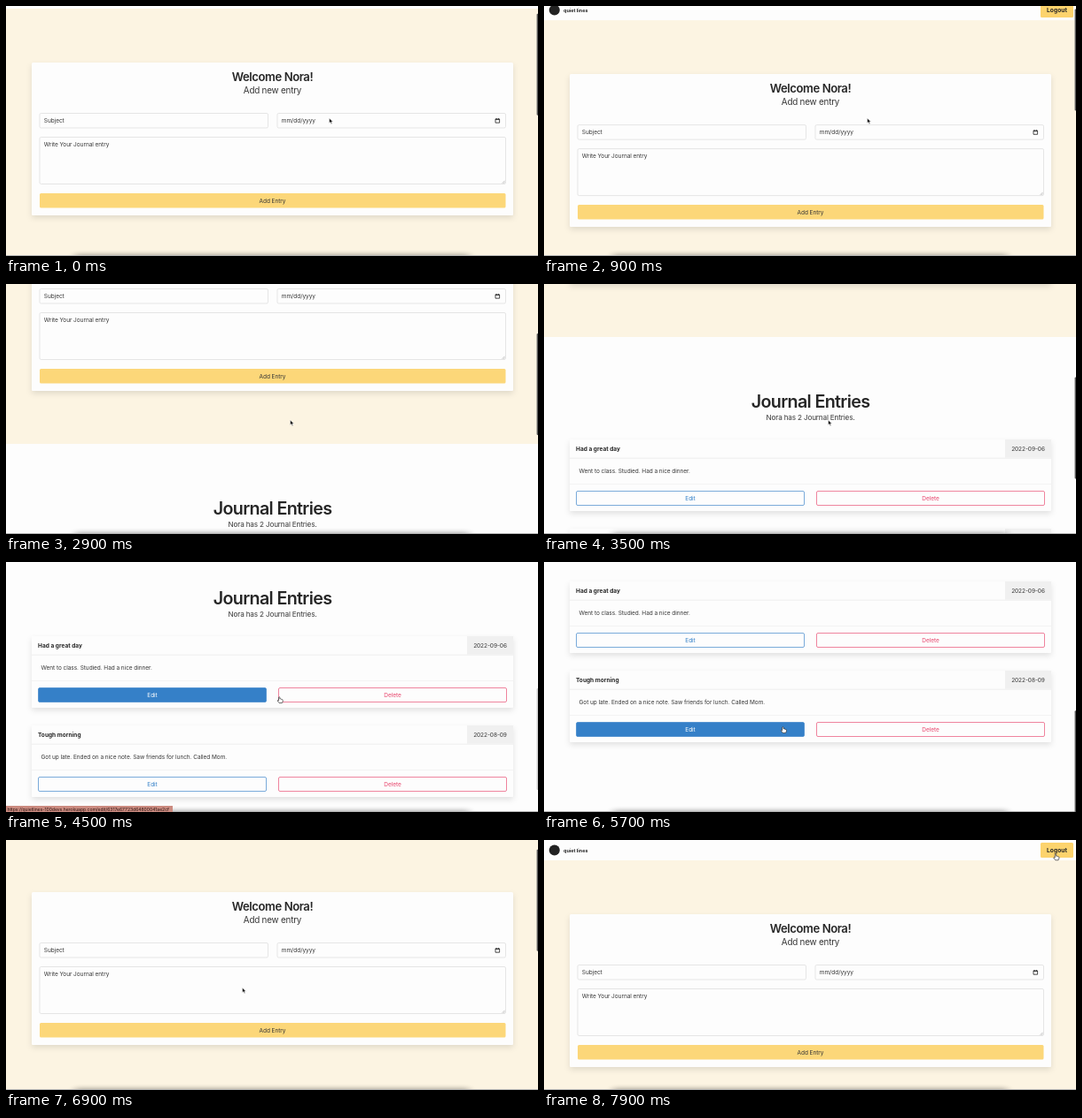
Animation, 600 px wide and 283 px high, one loop 8000 ms. Source, as an HTML page:

```html
<!DOCTYPE html>
<html lang="en">
<head>
<meta charset="utf-8">
<title>Journal</title>
<style>
  html, body { margin: 0; width: 100%; height: 100%; overflow: hidden; background: #fdfdfd; }
  svg { display: block; width: 100vw; height: 100vh; }
  text { font-family: Inter, "Open Sans", sans-serif; font-size: 6.5px; letter-spacing: -.008em; fill: #363636; white-space: pre; }
  .mid { text-anchor: middle; }
  .bold { font-weight: 700; letter-spacing: .005em; fill: #262626; }
  .head { font-weight: 600; letter-spacing: -.033em; fill: #262626; }
  .sub { letter-spacing: -.022em; }
  .field { fill: #fdfdfd; stroke: #dcdcdc; stroke-width: .7; }
</style>
</head>
<body>
<svg viewBox="0 0 600 283" preserveAspectRatio="none">
  <defs>
    <filter id="lift" x="-5%" y="-10%" width="110%" height="130%">
      <feDropShadow dx="0" dy="3" stdDeviation="3" flood-color="#0a0a0a" flood-opacity=".11"/>
    </filter>
    <filter id="edge" x="-2%" y="-20%" width="104%" height="150%">
      <feDropShadow dx="0" dy=".8" stdDeviation=".6" flood-color="#0a0a0a" flood-opacity=".1"/>
    </filter>
    <filter id="soft" x="-10%" y="-200%" width="120%" height="500%">
      <feGaussianBlur stdDeviation="5 2.8"/>
    </filter>
  </defs>
  <rect width="600" height="283" fill="#fdfdfd"/>
  <g id="page"></g>
  <rect x="78" y="281" width="444" height="8" opacity=".32" filter="url(#soft)"/>
  <rect y="282" width="600" height="1" fill="#b4b4b4"/>
  <rect id="thumb" x="598.6" width="2" height="115" rx="1" fill="#555"/>
  <g id="status">
    <rect y="276" width="188" height="7" fill="#cb8b80"/>
    <text id="link" x="1.5" y="281.6" style="font-size:5.1px;fill:#2e1713"></text>
  </g>
  <path id="arrow" d="M0 0V5.6L1.4 4.4L2.3 6.4L3.3 6L2.4 4H4.1Z" fill="#111" stroke="#fff" stroke-width=".5"/>
  <path id="hand" d="M-.3 .6Q.4 -.4 1.1 .6V2.4Q2 2 2.3 2.7Q3.2 2.4 3.4 3.1Q4.3 2.9 4.4 3.8V5.2L3.6 7H.3L-1.8 4.3Q-1.6 3.4 -.3 4.3Z" fill="#fff" stroke="#222" stroke-width=".65" stroke-linejoin="round"/>
</svg>
<script>
const LOOP = 8000, STEP = 100, LINK_DELAY = 600;
const BLUE = '#3580c8', RED = '#e8446c', YELLOW = '#fcd779';
const LINK = 'https://quietlines-100devs.herokuapp.com/edit/';
const $ = id => document.getElementById(id);
const clamp = v => Math.max(0, Math.min(1, v));

function add(parent, tag, attrs, text) {
  const el = document.createElementNS('http://www.w3.org/2000/svg', tag);
  for (const k in attrs) el.setAttribute(k, attrs[k]);
  if (text) el.textContent = text;
  return parent.appendChild(el);
}
const page = $('page');
const box = (x, y, width, height, more) => add(page, 'rect', { x, y, width, height, ...more });
const label = (x, y, text, cls = '', size = 6.5) =>
  add(page, 'text', { x, y, class: cls, style: `font-size:${size}px` }, text);
const panel = (y, height) => box(29, y, 543, height, { rx: 1.5, fill: '#fdfdfd', filter: 'url(#lift)' });

function field(x, y, width, height, hint) {
  box(x, y, width, height, { rx: 1.5, class: 'field' });
  label(x + 4.8, y + 10.8, hint);
}

// Anything the pointer can be over; link is set for the edit buttons
const targets = [];

function button(x, y, text, color, link) {
  const rect = box(x, y, 257, 16, { rx: 1.5, stroke: color, 'stroke-opacity': .65 });
  const caption = label(x + 128.5, y + 10.3, text, 'mid');
  const paint = on => {
    rect.setAttribute('fill', on ? color : '#fdfdfd');
    caption.style.fill = on ? '#fff' : color;
  };
  targets.push({ x, y, w: 257, h: 16, paint, link });
}

function entry(y, title, body, date, id) {
  panel(y, 81);
  box(29, y, 543, 20.5, { fill: '#fdfdfd', filter: 'url(#edge)' });
  box(520, y, 52, 20.5, { fill: '#f0f0f0' });
  label(36, y + 12.9, title, 'bold');
  label(546, y + 12.9, date, 'mid');
  label(39.5, y + 38.2, body);
  box(29, y + 50, 543, .7, { fill: '#efefef' });
  button(36.5, y + 58.5, 'Edit', BLUE, LINK + id);
  button(307.5, y + 58.5, 'Delete', RED);
}

// Top bar and entry form
box(0, 0, 600, 23, { fill: '#fdfdfd' });
box(0, 23, 600, 294, { fill: '#fcf4e2' });
add(page, 'circle', { cx: 11.8, cy: 11.5, r: 6, fill: '#222' });
label(22, 13.7, 'quiet lines', 'bold', 5.4);
box(560, 3, 37, 17, { rx: 1.5, fill: '#fcd36d' });
label(578.5, 14, 'Logout', 'mid bold', 6.7);
targets.push({ x: 560, y: 3, w: 37, h: 17, paint() {} });

panel(84, 173);
label(300.5, 104.6, 'Welcome Nora!', 'mid head', 13.1);
label(300.5, 119, 'Add new entry', 'mid sub', 9.9);
field(38, 141.5, 257.5, 16.5, 'Subject');
field(306, 141.5, 257.5, 16.5, 'mm/dd/yyyy');
field(38, 168.5, 525.5, 53, 'Write Your Journal entry');
add(page, 'path', { d: 'M552 148h4.6v4.2h-4.6zM552 148.6h4.6M553 147v1M555.6 147v1', fill: 'none', stroke: '#222', 'stroke-width': .8 });
add(page, 'path', { d: 'M559.6 220.8l3-3M561.3 220.8l1.3 -1.3', stroke: '#888', 'stroke-width': .5 });
box(38, 232, 525.5, 16.5, { rx: 1.5, fill: YELLOW });
label(300.5, 242.7, 'Add Entry', 'mid');

// Saved entries
label(300.5, 397.2, 'Journal Entries', 'mid head', 19.7);
label(300.5, 411, 'Nora has 2 Journal Entries.', 'mid sub', 8.2);
entry(433, 'Had a great day', 'Went to class. Studied. Had a nice dinner.', '2022-09-06', '6317e67723d64800041ae2cf');
entry(534, 'Tough morning', 'Got up late. Ended on a nice note. Saw friends for lunch. Called Mom.', '2022-08-09', '63188ea63e0ca70004885d62');

// Eased share of a move between two times
function ease(t, from, to) {
  const u = clamp((t - from) / (to - from));
  return u * u * (3 - 2 * u);
}

// Each swipe: start, end, distance
const swipes = [[-600, 200, -13], [700, 1000, -15], [1100, 2900, 133], [2900, 4000, 213],
  [4850, 5300, 62], [5800, 6755, -386], [6900, 7300, -25]];
const scrollAt = t => swipes.reduce((sum, [a, b, d]) => sum + d * ease(t, a, b), 31);

// Each pointer move: start, end, dx, dy
const moves = [[1900, 2600, -44, 27], [3700, 4000, -65.5, -4], [4250, 4500, 52.8, 2.6], [4500, 4700, 82, -2],
  [5100, 5600, -120.8, 35.8], [5750, 6000, -2.5, -19.2], [6900, 7800, 310, -151.4]];
function pointerAt(t) {
  const p = { x: 364.5, y: 127 };
  for (const [a, b, dx, dy] of moves) {
    const e = ease(t, a, b);
    p.x += dx * e;
    p.y += dy * e;
  }
  return p;
}

// What lies under the pointer; nothing reacts during a fast scroll
function hoverAt(t) {
  const scroll = scrollAt(t), p = pointerAt(t);
  if (Math.abs(scroll - scrollAt(t - STEP)) > 20) return;
  const y = p.y + scroll;
  return targets.find(b => p.x > b.x && p.x < b.x + b.w && y > b.y && y < b.y + b.h);
}

function idleSteps(t) {
  let n = 0;
  while (n < 8 && Math.abs(scrollAt(t) - scrollAt(t - STEP * (n + 1))) < .01) n++;
  return n;
}

const show = (el, on) => el.setAttribute('visibility', on ? 'visible' : 'hidden');

function draw(t) {
  const scroll = scrollAt(t), p = pointerAt(t);
  page.setAttribute('transform', `translate(0 ${-scroll})`);
  $('thumb').setAttribute('y', scroll * .408 + .6);
  $('thumb').setAttribute('opacity', clamp(5.3 - idleSteps(t)));

  const over = hoverAt(t - STEP);
  for (const b of targets) b.paint(b === over);

  const link = hoverAt(t - LINK_DELAY)?.link;
  show($('status'), link);
  $('link').textContent = link || '';

  for (const id of ['arrow', 'hand']) {
    $(id).setAttribute('transform', `translate(${p.x} ${p.y})`);
    show($(id), !!over === (id === 'hand'));
  }
}

const start = performance.now();
function tick() {
  const t = (performance.now() - start) % LOOP;
  draw(Math.floor(t / STEP) * STEP);
  requestAnimationFrame(tick);
}
tick();
</script>
</body>
</html>
```
